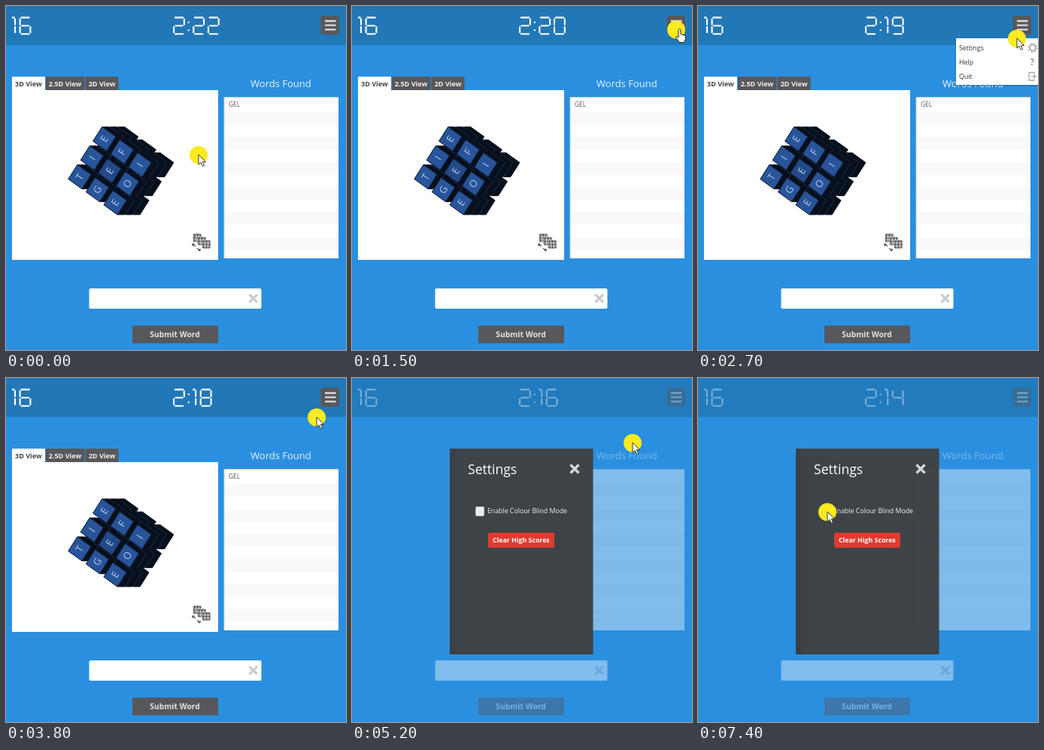
These frames come from a looping animation (452 by 458 pixels, 8 s). An HTML page:

```html
<!DOCTYPE html>
<html lang="en">
<head>
<meta charset="utf-8">
<title>Word cube</title>
<style>
  html, body { margin: 0; width: 100%; height: 100%; overflow: hidden; background: #2b8fdf; }
  svg { display: block; width: 452px; height: 458px; font-family: "Open Sans", "Noto Sans", sans-serif; }
  .bold { font-weight: 700; }
  .digits { fill: none; stroke: #fff; stroke-width: 2.1; }
</style>
</head>
<body>
<svg viewBox="0 0 452 458">
  <rect width="452" height="458" fill="#2b8fdf"/>
  <rect id="header" width="452" height="52" fill="#2278b7"/>

  <g id="page">
    <path id="score" class="digits"/>
    <path id="clock" class="digits"/>
    <rect x="418.500" y="13" width="24.500" height="25" rx="3" fill="#58575b"/>
    <path d="M424 20h14.500M424 25.700h14.500M424 31.400h14.500" stroke="#dcdcdc" stroke-width="2.300"/>
    <text x="325" y="108" font-size="13" fill="#e9f4fd">Words Found</text>
    <rect x="290" y="121" width="152" height="215" fill="#fff"/>
    <g id="rows" fill="#faf8fb"></g>
    <path d="M290 336V121.500H442" fill="none" stroke="#c3cbd3"/>
    <text id="found" x="296" y="134" font-size="8.300" fill="#555">GEL</text>
    <rect x="110.500" y="376" width="229" height="27" rx="2" fill="#fff"/>
    <path d="M323.500 384l10.500 10.500m0-10.500l-10.500 10.500" stroke="#c9cdd2" stroke-width="3.200"/>
    <rect x="168" y="425.500" width="114" height="23.500" rx="1.500" fill="#58575b"/>
    <text class="bold" x="191.300" y="440.800" font-size="10.300" fill="#e2e2e2">Submit Word</text>
  </g>

  <g id="view">
    <g id="tabs" class="bold" font-size="9.050"></g>
    <rect x="8" y="112" width="274" height="226" fill="#fff"/>
    <g id="cube"></g>
    <g id="spread"></g>
  </g>

  <g id="menu">
    <rect x="341.500" y="43" width="113" height="64" fill="#0b3a63" opacity=".25"/>
    <rect x="343" y="43" width="110" height="62" fill="#fff"/>
    <g font-size="8.900" fill="#333">
      <text x="347" y="59">Settings</text>
      <text x="347" y="78">Help</text>
      <text x="347" y="97">Quit</text>
    </g>
    <g fill="none" stroke="#aaa">
      <circle cx="445" cy="55.500" r="3.700" stroke-width="1.500"/>
      <circle cx="445" cy="55.500" r="5.400" stroke-width="2" stroke-dasharray="2.120"/>
      <path d="M447 90.500V88.500H440V99H447V97M443 93.800H449M446.500 91.300L449 93.800L446.500 96.300" stroke-width="1.300"/>
    </g>
    <text class="bold" x="441.500" y="79" font-size="12" fill="#999">?</text>
  </g>

  <g id="dialog">
    <rect x="130" y="94" width="190.500" height="274" fill="#3f4346" opacity=".985"/>
    <path d="M133.500 94V368" stroke="#383c3f" stroke-width="7" opacity=".5"/>
    <text x="154" y="127.500" font-size="17.600" fill="#fff">Settings</text>
    <path d="M290.500 115.500l11 11m0-11l-11 11" stroke="#d5d6d7" stroke-width="3.300"/>
    <rect x="164.500" y="171.500" width="11" height="12" rx="1.500" fill="#ececec" stroke="#c4c4c4"/>
    <text x="180" y="180.300" font-size="8.750" fill="#f2f2f2">Enable Colour Blind Mode</text>
    <rect x="181" y="206" width="88" height="20" rx="2" fill="#df3b2f"/>
    <text class="bold" x="187" y="219.200" font-size="8.800" fill="#fff">Clear High Scores</text>
  </g>

  <g id="pointer">
    <circle cy=".5" r="12" fill="#fdea1f"/>
    <path id="arrow" d="M0 0V13.200l3-2.800 2.300 5 2.300-1-2.300-4.800h4.300z" fill="#fff" stroke="#222" stroke-width=".9"/>
    <path id="hand" d="M3 0.500q1.500-2 3 0v6l5 1.500q1.500.5 1.500 2v3l-1.800 4.500h-6.400l-4.700-6.500q0-2 2-1.500l1.400 1.500z" fill="#fff" stroke="#222" stroke-width="1"/>
  </g>
</svg>

<script>
const LOOP = 8000, STEP = 100;
const $ = id => document.getElementById(id);
const clamp = v => Math.min(1, Math.max(0, v));
const ramp = (t, from, to) => clamp((t - from) / (to - from));

// Seven-segment figures in a 16 x 24 cell
const SEGMENTS = {
  a: "M2 1.1H14", b: "M14.900 2.300V11.200", c: "M14.900 12.800V21.700", d: "M2 22.900H14",
  e: "M1.100 12.800V21.700", f: "M1.100 2.300V11.200", g: "M2.500 12H13.500"
};
const FIGURES = {
  0: "abcdef", 2: "abged", 4: "fgbc", 5: "afgcd", 6: "afgedc", 7: "abc", 8: "abcdefg", 9: "abcdfg"
};
const ONE = "M0 1.100H3.500M4 2.300V11.200M4 12.800V21.700";
const COLON = "M0 7.500H2.200M0 18H2.200";

function figures(text, x, y) {
  let path = "";
  for (const ch of text) {
    const d = ch === "1" ? ONE : ch === ":" ? COLON : [...FIGURES[ch]].map(s => SEGMENTS[s]).join("");
    path += d.replace(/M([\d.]+) ([\d.]+)([HV])([\d.]+)/g, (_, mx, my, dir, end) =>
      `M${x + +mx} ${y + +my}${dir}${+end + (dir === "H" ? x : y)}`);
    x += ch === "1" ? 9.5 : ch === ":" ? 6.5 : 19.7;
  }
  return path;
}

function drawTabs() {
  const tabs = [["3D View", 8, 44, 12], ["2.5D View", 53, 51.5, 56.7], ["2D View", 105.5, 44, 109.7]];
  $("tabs").innerHTML = tabs.map(([label, x, w, tx], i) =>
    `<rect x="${x}" y="94" width="${w}" height="18" rx="1" fill="${i ? "#58575b" : "#fff"}"/>
     <text x="${tx}" y="106.800" fill="${i ? "#f0f0f0" : "#444"}">${label}</text>`).join("");
}

function drawRows() {
  let rows = "";
  for (let i = 0; i < 6; i++) rows += `<rect x="291" y="${141 + i * 33.4}" width="151" height="16.700"/>`;
  $("rows").innerHTML = rows;
}

function drawCube() {
  const letters = ["EFI", "IEO", "TGE"];
  const corner = [[-15, 3], [-3, -16], [15, -3], [3, 16]];
  const depth = 9;
  const poly = (pts, x, y, attrs) =>
    `<polygon points="${pts.map(p => (p[0] + x) + "," + (p[1] + y)).join(" ")}" ${attrs}/>`;
  const push = p => [p[0] + depth, p[1]];
  const [left, top, right, bottom] = corner;
  const hull = [left, top, push(top), push(right), push(bottom), bottom];
  let out = "";
  for (let layer = 2; layer >= 0; layer--) {
    let sides = "", faces = "";
    for (let row = 0; row < 3; row++) for (let col = 0; col < 3; col++) {
      const x = 130.7 + col * 23.6 - row * 16.4 + layer * 10.5;
      const y = 177 + col * 17.2 + row * 25.2;
      const fill = layer ? "#111d34" : row === 1 && col === 1 ? "#224a88" : "#28549a";
      sides += poly(hull, x, y, 'fill="#080f1c" stroke="#080f1c" stroke-width="1"');
      faces += poly(corner, x, y, `fill="${fill}" stroke="${layer ? "#3b5273" : "#142743"}" stroke-width=".8" stroke-dasharray="${layer ? "1 1.500" : "none"}"`);
      if (!layer) faces += `<text transform="translate(${x} ${y}) rotate(-57)" y="4.600" text-anchor="middle" font-size="13" fill="#b4cdec">${letters[row][col]}</text>`;
    }
    out += sides + faces;
  }
  $("cube").innerHTML = out;
}

function drawSpread() {
  let out = "";
  for (let i = 0; i < 3; i++) {
    const x = 248.5 + i * 6, y = 303 + i * 4.3;
    out += `<rect x="${x}" y="${y}" width="11.500" height="11.500" rx="2" fill="#666" stroke="#fff" stroke-width=".5"/>
      <path d="M${x + 4} ${y + 1}v10m4-10v10M${x + 1} ${y + 4}h10m-10 4h10" stroke="#e4e4e4" stroke-width=".8"/>`;
  }
  out += '<path d="M252 320l-4-3m0 2.500v-2.500h2.500M254 322.500l4 3m0-2.500v2.500h-2.500" fill="none" stroke="#555" stroke-width="1.300"/>';
  $("spread").innerHTML = out;
}

const linear = k => k;
const easeIn = k => k * k;
const easeOut = k => k * (2 - k);
const smooth = k => k * k * (3 - 2 * k);

// time, x, y, easing into that place
const PATH = [
  [0, 256, 198, linear], [100, 256, 198, linear], [900, 431, 31, smooth],
  [2200, 431, 31, linear], [2700, 424, 43, smooth], [3200, 413, 52, easeOut],
  [4500, 413, 52, linear], [5200, 373, 86, easeIn], [6100, 208, 163, linear],
  [7000, 172, 178, easeOut], [LOOP, 172, 178, linear]
];

function place(t) {
  const i = PATH.findIndex(p => p[0] > t);
  const [t0, x0, y0] = PATH[i - 1], [t1, x1, y1, ease] = PATH[i];
  const k = ease((t - t0) / (t1 - t0));
  return [x0 + (x1 - x0) * k, y0 + (y1 - y0) * k];
}

function draw(t) {
  const left = 22 - Math.floor((t + 800) / 1000);
  $("clock").setAttribute("d", figures("2:" + left, 222, 14.3));

  const [x, y] = place(t);
  const onButton = x > 418 && y < 38;
  $("pointer").setAttribute("transform", `translate(${x} ${y})`);
  $("hand").style.opacity = onButton ? 1 : 0;
  $("arrow").style.opacity = onButton ? 0 : 1;

  $("menu").style.opacity = ramp(t, 1500, 1700) * (1 - ramp(t, 3400, 3600));
  const open = ramp(t, 3800, 4200);
  $("dialog").style.opacity = open;
  $("view").style.opacity = 1 - open;
  $("found").style.opacity = 1 - open;
  $("page").style.opacity = 1 - 0.59 * open;
  $("header").style.opacity = 1 - 0.15 * open;
}

function tick() {
  const t = performance.now() % LOOP;
  draw(Math.floor(t / STEP) * STEP);
  requestAnimationFrame(tick);
}

$("score").setAttribute("d", figures("16", 8, 14.3));
drawTabs();
drawRows();
drawCube();
drawSpread();
tick();
</script>
</body>
</html>
```
